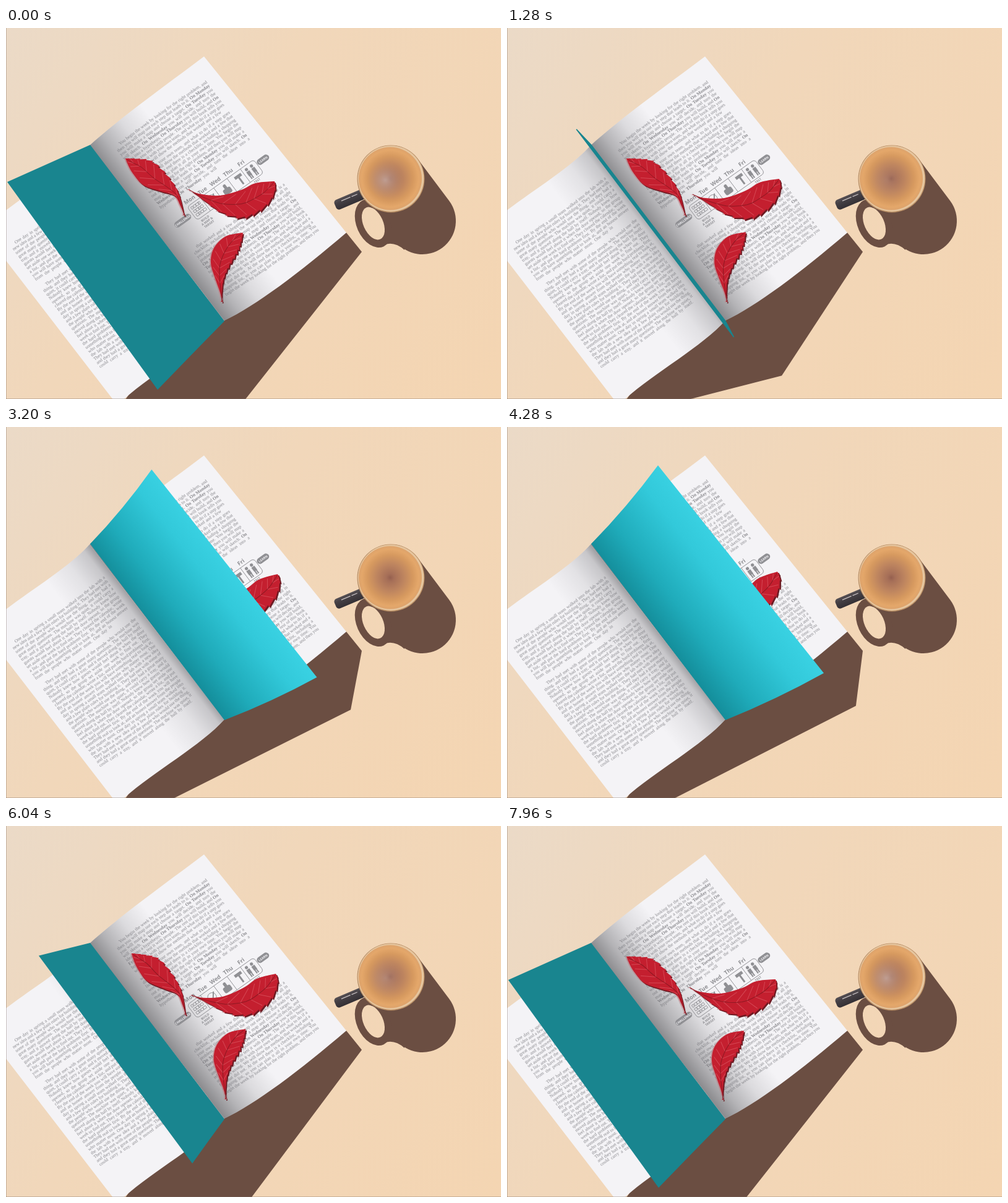
Recreate the animation shown at these times as an HTML page with a canvas. Size 800 px wide and 600 px high, loop 8 s.

```html
<!DOCTYPE html>
<html lang="en">
<head>
<meta charset="utf-8">
<title>Book and coffee</title>
<style>
html, body { margin: 0; width: 100%; height: 100%; overflow: hidden; background: #f1d7bb; }
canvas { display: block; width: 800px; height: 600px; }
</style>
</head>
<body>
<canvas id="stage" width="800" height="600"></canvas>
<script>
const W = 800, H = 600, LOOP = 8000;
const SHADE = '#6b4e42', RED = '#c41f2f';
const ctx = document.getElementById('stage').getContext('2d');

// ---- helpers ----
function layer(draw) {
  const c = document.createElement('canvas');
  c.width = W; c.height = H;
  draw(c.getContext('2d'));
  return c;
}

function linear(g, x0, y0, x1, y1, stops) {
  const grad = g.createLinearGradient(x0, y0, x1, y1);
  stops.forEach(([at, color]) => grad.addColorStop(at, color));
  return grad;
}

function radial(g, x, y, r, stops) {
  const grad = g.createRadialGradient(x, y, 0, x, y, r);
  stops.forEach(([at, color]) => grad.addColorStop(at, color));
  return grad;
}

function polygon(g, pts, fill) {
  g.beginPath();
  pts.forEach(([x, y]) => g.lineTo(x, y));
  g.closePath();
  g.fillStyle = fill;
  g.fill();
}

function disc(g, x, y, r, fill) {
  g.beginPath();
  g.arc(x, y, r, 0, Math.PI * 2);
  g.fillStyle = fill;
  g.fill();
}

const mix = (a, b, k) => a + (b - a) * k;
const mixPt = (a, b, k) => [mix(a[0], b[0], k), mix(a[1], b[1], k)];

// Smooth monotone curve through looping keys [time, ...values]
function track(keys) {
  const n = keys.length;
  const key = i => {
    const turn = Math.floor(i / n), k = keys[i - turn * n];
    return [k[0] + turn * LOOP, ...k.slice(1)];
  };
  const slope = (a, b, c) => (b[c] - a[c]) / (b[0] - a[0]);
  const tangent = (i, c) => {
    const l = slope(key(i - 1), key(i), c), r = slope(key(i), key(i + 1), c);
    return l * r <= 0 ? 0 : 2 * l * r / (l + r);
  };
  return time => {
    const t = time % LOOP;
    let i = n - 1;
    while (keys[i][0] > t) i--;
    const a = key(i), b = key(i + 1), d = b[0] - a[0], s = (t - a[0]) / d;
    return a.slice(1).map((v, j) => {
      const c = j + 1, q = s * s, u = q * s;
      return v * (2 * u - 3 * q + 1) + b[c] * (3 * q - 2 * u) +
        d * (tangent(i, c) * (u - 2 * q + s) + tangent(i + 1, c) * (u - q));
    });
  };
}

// ---- motion ----
const turnAt = track([[0, 0], [840, .074], [1280, .4545], [1680, .69], [2520, .898],
  [3360, .973], [4200, 1], [4300, 1], [4800, .9], [5060, .631], [5360, .45],
  [5880, .252], [6720, .0785], [7560, .004]]);
const foamAt = track([[0, 1], [1280, .25], [3200, 0], [5360, 0], [6760, 1]]);

// ---- table, mug ----
const ground = layer(g => {
  const table = linear(g, 0, 0, W, H, [[0, '#ebdac7'], [.4, '#f1d7ba'], [1, '#f4d5b2']]);
  g.fillStyle = table;
  g.fillRect(0, 0, W, H);

  // mug shadow
  g.strokeStyle = SHADE;
  g.lineWidth = 108;
  g.lineCap = 'round';
  g.beginPath();
  g.moveTo(622, 244);
  g.lineTo(673, 312);
  g.stroke();
  const ring = (rx, ry, fill) => {
    g.beginPath();
    g.ellipse(593.5, 316, rx, ry, -.42, 0, Math.PI * 2);
    g.fillStyle = fill;
    g.fill();
  };
  ring(27, 41, SHADE);
  g.fillStyle = SHADE;
  g.beginPath();
  g.moveTo(608, 352);
  g.quadraticCurveTo(626, 343, 644, 359);
  g.lineTo(644, 325);
  g.lineTo(614, 325);
  g.fill();
  ring(16, 28, table);
});

const mug = layer(g => {
  g.save();
  g.translate(532, 287);
  g.rotate(-.4);
  g.fillStyle = linear(g, 0, -8, 0, 9, [[0, '#565054'], [.35, '#454045'], [1, '#343035']]);
  g.beginPath();
  g.roundRect(0, -8, 60, 17, 5);
  g.fill();
  g.fillStyle = 'rgba(235,228,228,.8)';
  g.fillRect(12, -3.5, 16, 1.2);
  g.fillRect(30, -3.5, 10, 1.2);
  g.restore();
  disc(g, 622, 244, 54.5, '#b98f66');
  disc(g, 622, 243.6, 53.3, '#e6c69f');
  disc(g, 621, 243.5, 51, radial(g, 621, 243.5, 51, [[0, '#95604f'], [.12, '#a66f58'],
    [.42, '#bd845f'], [.72, '#d6995f'], [.9, '#e4a76a'], [1, '#dda36c']]));
});

// ---- book ----
const TOP = [135, 190], BOTTOM = [353, 473];

const shape = {
  left: g => {
    g.beginPath();
    g.moveTo(...TOP);
    g.bezierCurveTo(95, 235, 10, 280, -38, 327);
    g.lineTo(180, 610);
    g.bezierCurveTo(228, 563, 313, 518, ...BOTTOM);
  },
  right: g => {
    g.beginPath();
    g.moveTo(...TOP);
    g.bezierCurveTo(185, 145, 255, 95, 320, 46);
    g.lineTo(550, 331);
    g.bezierCurveTo(475, 395, 403, 450, ...BOTTOM);
  }
};

const PROSE = ('One day in spring a small team walked into the lab with a new idea and a few ' +
  'plain rules for building it. They had met with some of the people who would use the thing, ' +
  'and they had a great many questions. The machine was quiet, it could carry a tray, and it ' +
  'moved along the hall by itself. Nobody knew how guests would feel about it when the door ' +
  'opened, so the group set aside one week to find out. They cleared the calendar, wrote a ' +
  'list, and put the hard problems first. By the end of the week you will have something real ' +
  'to look at, and an honest answer from the people who matter most. ').trim().split(' ');
const PLAN = ('You begin the week by looking for the right problem, and then you will map out ' +
  'each step that leads to it. *On *Monday you will make a map and choose a target. *On *Tuesday ' +
  'you will sketch. *On *Wednesday you will decide, and turn the ideas into a hypothesis. *On ' +
  '*Thursday you will build, and *On *Friday you test it with people. The rest of this book ' +
  'tells you how to do it with your own team, and what to do if a step goes wrong. We will ' +
  'show the methods that worked and a few that did not. At the end there is a checklist, ' +
  'including a shopping list, so you can plan it all in your own time. ').trim().split(' ');

const font = bold => `${bold ? 'bold ' : ''}7.4px "Liberation Serif", "Noto Serif", serif`;

// Justified lines; a negative width in `short` style is set by line index
function prose(g, words, from, y, lines, width, sag, lastWidth) {
  let w = from;
  for (let i = 0; i < lines; i++, y += 7.6) {
    const indent = i === 0 ? 9 : 0;
    const room = (i === lines - 1 ? lastWidth : width) - indent;
    const row = [];
    let used = 0;
    for (;;) {
      const raw = words[w % words.length], bold = raw[0] === '*';
      const text = bold ? raw.slice(1) : raw;
      g.font = font(bold);
      const size = g.measureText(text).width;
      if (used + size + row.length * 1.5 > room) break;
      row.push({ text, bold, size });
      used += size;
      w++;
    }
    const gap = (room - used) / Math.max(1, row.length - 1);
    let x = indent;
    for (const { text, bold, size } of row) {
      g.font = font(bold);
      g.fillText(text, x, y + sag * Math.sin(Math.PI * x / width));
      x += size + gap;
    }
  }
}

function pill(g, x, y, w, text) {
  g.fillStyle = '#909094';
  g.beginPath();
  g.roundRect(x - w / 2, y - 5, w, 10, 5);
  g.fill();
  label(g, text, x, y + 2, 5, '#f4f3f6');
}

function label(g, text, x, y, size, color) {
  g.font = `bold ${size}px "Open Sans", sans-serif`;
  g.textAlign = 'center';
  g.fillStyle = color;
  g.fillText(text, x, y);
  g.textAlign = 'left';
}

function weekChart(g) {
  const ink = '#909094';
  g.strokeStyle = ink;
  g.lineWidth = .9;
  g.beginPath();
  g.roundRect(36, 144, 132, 27, 5);
  for (let i = 1; i < 5; i++) {
    g.moveTo(36 + i * 26.4, 144);
    g.lineTo(36 + i * 26.4, 171);
  }
  g.stroke();
  ['Mon', 'Tue', 'Wed', 'Thu', 'Fri'].forEach((d, i) => label(g, d, 46 + i * 25.5, 140, 9, ink));
  pill(g, 17, 158, 31, 'CHALLENGE');
  pill(g, 180, 153, 22, 'LEARN');
  ['BUILD', 'A MAP &', 'TARGET'].forEach((s, i) => label(g, s, 48, 178 + i * 5.5, 5, ink));
  label(g, 'TEST', 152, 177, 5, ink);

  // cell icons: map, check, sketch, hammer, people
  for (let i = 0; i < 12; i++) {
    g.strokeRect(40 + (i % 4) * 4.6, 148 + Math.floor(i / 4) * 7, 3.2 + i % 3, 4);
  }
  g.beginPath();
  g.arc(76, 157, 7, 0, 7);
  g.stroke();
  g.lineWidth = 2;
  g.beginPath();
  g.moveTo(71, 156); g.lineTo(75, 161); g.lineTo(83, 151);
  g.stroke();
  g.fillStyle = ink;
  g.beginPath();
  g.roundRect(97, 156, 14, 10, 3);
  g.roundRect(102, 149, 5, 11, 2);
  g.fill();
  g.fillRect(125, 149, 13, 5);
  g.fillRect(130, 153, 3, 14);
  [149, 159].forEach(x => {
    disc(g, x, 150.5, 2.6, ink);
    g.fillRect(x - 3, 154, 6, 8);
    g.fillRect(x - 2.5, 161, 2, 7);
    g.fillRect(x + .5, 161, 2, 7);
  });
}

const book = layer(g => {
  shape.left(g);
  g.fillStyle = '#f4f3f6';
  g.fill();
  g.fillStyle = linear(g, 244, 331, 172, 387, [[0, 'rgba(70,70,74,.48)'], [.14, 'rgba(70,70,74,.26)'],
    [.5, 'rgba(70,70,74,.1)'], [1, 'rgba(70,70,74,0)']]);
  g.fill();
  shape.right(g);
  g.fillStyle = '#f4f3f6';
  g.fill();
  g.fillStyle = linear(g, 244, 331, 328, 266, [[0, 'rgba(55,55,58,.55)'], [.25, 'rgba(55,55,58,.34)'],
    [.6, 'rgba(55,55,58,.13)'], [1, 'rgba(55,55,58,0)']]);
  g.fill();

  const ink = 'rgba(112,112,117,.82)';
  g.save();
  g.transform(.81, -.586, .593, .805, 8, 354);
  g.fillStyle = ink;
  prose(g, PROSE, 0, 0, 10, 188, 4, 150);
  prose(g, PROSE, 23, 84, 22, 188, 4, 183);
  g.restore();

  g.save();
  g.transform(.814, -.58, .6, .8, 177, 195);
  g.fillStyle = ink;
  prose(g, PLAN, 0, 0, 8, 183, -2, 172);
  prose(g, PLAN, 72, 61, 9, 183, 0, 112);
  prose(g, PLAN, 92, 207, 13, 184, 3, 184);
  weekChart(g);
  g.restore();
});

// ---- leaves ----
function curve(pts, s) {
  const n = pts.length - 1, i = Math.min(n - 1, Math.floor(s * n)), k = s * n - i;
  const [a, b, c, d] = [-1, 0, 1, 2].map(o => pts[Math.max(0, Math.min(n, i + o))]);
  return [0, 1].map(j => b[j] + .5 * k * (c[j] - a[j] +
    k * (2 * a[j] - 5 * b[j] + 4 * c[j] - d[j] + k * (3 * (b[j] - c[j]) + d[j] - a[j]))));
}

// Both edges run from the tip to the stem; the first one is toothed
function makeLeaf(tip, stem, toothed, plain, keys) {
  const edgeA = [tip, ...toothed, stem], edgeB = [tip, ...plain, stem];
  const rib = s => mixPt(curve(edgeA, s), curve(edgeB, s), .52);
  const body = new Path2D();
  const teeth = 15;
  body.moveTo(...tip);
  for (let i = 1; i < teeth; i++) {
    const s = i / teeth, p = curve(edgeA, s);
    body.lineTo(...p);
    if (s < .8) body.lineTo(...mixPt(p, rib(s), .15));
  }
  body.lineTo(stem[0] + 1, stem[1]);
  body.lineTo(stem[0] - 1.5, stem[1]);
  for (let i = 29; i > 0; i--) body.lineTo(...curve(edgeB, i / 30));
  body.closePath();

  const midrib = new Path2D(), veins = new Path2D();
  for (let i = 1; i <= 20; i++) midrib.lineTo(...rib(i / 20));
  for (let i = 2; i < 9; i++) {
    const s = i / 11;
    for (const edge of [edgeA, edgeB]) {
      veins.moveTo(...rib(s));
      veins.lineTo(...mixPt(rib(s - .07), curve(edge, Math.max(0, s - .1)), .78));
    }
  }

  const pose = track(keys);
  const ax = stem[0] - tip[0], ay = stem[1] - tip[1];
  return (g, t) => {
    const [x, y, sx, sy] = pose(t);
    g.save();
    g.translate(x, y);
    g.rotate(Math.atan2(sy - y, sx - x) - Math.atan2(ay, ax));
    const k = Math.hypot(sx - x, sy - y) / Math.hypot(ax, ay);
    g.scale(k, k);
    g.translate(-tip[0], -tip[1]);
    const cast = (dx, dy, fill) => {
      g.save();
      g.translate(dx, dy);
      g.fillStyle = fill;
      g.fill(body);
      g.restore();
    };
    cast(-2, .5, 'rgba(190,125,132,.6)');
    cast(1.8, 2.2, '#6e1a22');
    cast(0, 0, RED);
    g.lineWidth = 1;
    g.strokeStyle = 'rgba(222,95,105,.65)';
    g.stroke(veins);
    g.strokeStyle = '#8d1822';
    g.stroke(midrib);
    g.restore();
  };
}

const leaves = [
  makeLeaf([193, 211], [288, 303],
    [[213, 211], [238, 215], [262, 238], [278, 263], [284, 285]],
    [[198, 223], [205, 235], [222, 254], [250, 264], [272, 271], [282, 288]],
    [[0, 193, 211, 288, 303], [1280, 193, 211, 288, 303], [4280, 205, 205, 291, 306],
      [5360, 205, 205, 291, 306], [6760, 199, 208, 289, 304]]),
  makeLeaf([434, 248], [295, 261],
    [[436, 262], [425, 285], [403, 302], [380, 309], [350, 301], [326, 284], [309, 270]],
    [[416, 249], [400, 252], [380, 262], [345, 271], [312, 268]],
    [[0, 434, 248, 295, 261], [1280, 440, 244, 300, 269], [3200, 439, 238, 303, 277],
      [4280, 437, 234, 303, 280], [5360, 438, 236, 303, 279], [6760, 434, 243, 296, 266]]),
  makeLeaf([383, 331], [349, 443],
    [[380, 350], [374, 366], [362, 385], [353, 404], [349, 425]],
    [[355, 337], [336, 356], [331, 380], [338, 405], [346, 428]],
    [[0, 383, 331, 349, 443], [1280, 386, 330, 355, 443], [4280, 390, 327, 361, 441],
      [5360, 390, 327, 361, 441], [6760, 384, 330, 349, 443]])
];

// ---- turning page ----
function flap(g, p) {
  const a = mixPt([2, 249], [244, 62], p), b = mixPt([245, 585], [512, 398], p);
  const right = p > .472;
  let fill = '#19858f';
  if (right) {
    const [mx, my] = mixPt(a, b, .5);
    const w = Math.max(20, Math.hypot(mx - 244, my - 331));
    fill = linear(g, 244, 331, 244 + .79 * w, 331 - .61 * w,
      [[0, '#148e9b'], [.3, '#1fabba'], [.75, '#32c9da'], [1, '#39d1e2']]);
  }
  const bend = right ? 6 * Math.min(1, (p - .472) * 4) : 0;
  const mid = (u, v) => { const [x, y] = mixPt(u, v, .5); return [x + bend * .6, y + bend * .8]; };
  g.beginPath();
  g.moveTo(136, 189);
  g.quadraticCurveTo(...mid([136, 189], a), ...a);
  g.lineTo(...b);
  g.quadraticCurveTo(...mid(BOTTOM, b), 353, 474);
  g.closePath();
  g.fillStyle = fill;
  g.fill();
  if (Math.abs(p - .472) < .06) {
    g.strokeStyle = '#17858f';
    g.lineWidth = 1.5;
    g.stroke();
  }
}

function frame(t) {
  const [p] = turnAt(t);
  const [q] = turnAt(t > 4000 ? t + 120 : t);
  ctx.drawImage(ground, 0, 0);
  polygon(ctx, [[550, 331], [575, 362], mixPt([343, 656], [565, 450], q),
    [246, 613], [185, 612], [300, 450]], SHADE);
  ctx.drawImage(book, 0, 0);
  leaves.forEach(leaf => leaf(ctx, t));
  flap(ctx, p);
  ctx.drawImage(mug, 0, 0);
  const [foam] = foamAt(t);
  disc(ctx, 613, 246, 30, radial(ctx, 613, 246, 30, [[0, `rgba(196,168,160,${.8 * foam})`],
    [.5, `rgba(190,150,130,${.5 * foam})`], [1, 'rgba(200,150,110,0)']]));
  ctx.fillStyle = 'rgba(120,105,95,.35)';
  ctx.fillRect(0, 0, 1, H);
  ctx.fillRect(0, H - 1, W, 1);
}

const start = performance.now();
function tick() {
  frame((performance.now() - start) % LOOP);
  requestAnimationFrame(tick);
}
tick();
</script>
</body>
</html>
```
